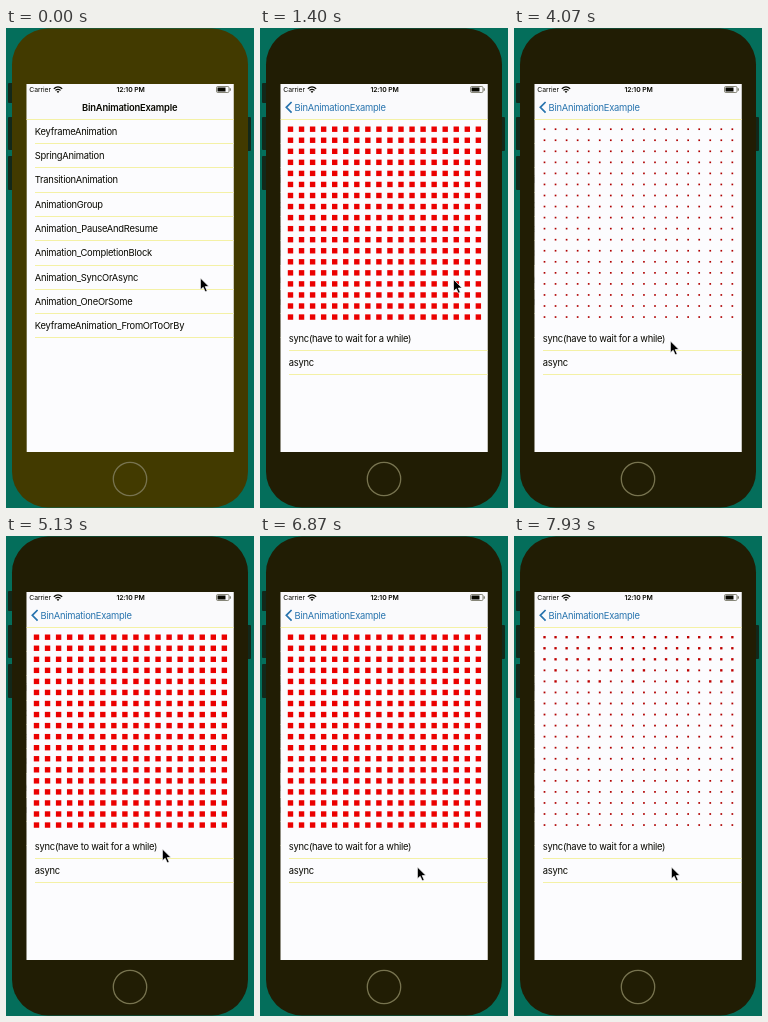
Animation of 248x480 px, one loop 8 s. Source, as an HTML page:

```html
<!DOCTYPE html>
<html lang="en">
<head>
<meta charset="utf-8">
<title>Animation list</title>
<style>
  html, body { margin: 0; width: 100%; height: 100%; overflow: hidden; background: #046e5b; }
  svg { display: block; width: 248px; height: 480px; }
  text { font: 9.4px Inter, "Liberation Sans", sans-serif; letter-spacing: -.25px; fill: #080800; }
  .title { font-weight: 600; letter-spacing: -.2px; }
  .back { fill: #2874ae; }
  .status { font-size: 6.8px; letter-spacing: -.1px; }
  .clock { font-weight: 600; text-anchor: middle; }
  .line { fill: #f4f1a6; }
</style>
</head>
<body>
<svg viewBox="0 0 248 480">
  <defs>
    <clipPath id="screen"><rect x="20.7" y="56" width="206.8" height="368"/></clipPath>
  </defs>

  <g fill="#12281a">
    <rect x="2" y="55" width="6" height="20" rx="1"/>
    <rect x="2" y="89" width="6" height="33" rx="1"/>
    <rect x="2" y="128" width="6" height="34" rx="1"/>
    <rect x="239" y="89" width="6" height="34" rx="1"/>
  </g>
  <rect id="body" x="6" y="0.5" width="236" height="479" rx="36"/>
  <circle cx="124" cy="451" r="16.7" fill="none" stroke="#77734f" stroke-width="1.3"/>

  <g clip-path="url(#screen)">
    <rect x="20" y="56" width="208" height="368" fill="#fcfcfe"/>
    <g id="list">
      <rect id="selected" x="20" y="237.5" width="208" height="24.3" fill="#d9d9d9"/>
    </g>
    <rect id="dim" x="20" y="92" width="208" height="332" fill="#7d6c00"/>
    <g id="detail">
      <rect x="20" y="92" width="208" height="332" fill="#fcfcfe"/>
      <g id="grid"></g>
    </g>

    <rect x="20" y="56" width="208" height="36" fill="#fafafc"/>
    <rect class="line" x="20" y="91" width="208" height="1"/>
    <text class="status" x="23.3" y="64.2">Carrier</text>
    <g fill="none" stroke="#080800" stroke-width="1.2">
      <path d="M47.8 60.7Q52 57 56.2 60.7M49.4 62.4Q52 60.2 54.6 62.4"/>
    </g>
    <path d="M50.6 63.4Q52 62.4 53.4 63.4L52 65Z" fill="#080800"/>
    <text class="status clock" x="124.5" y="64.2">12:10 PM</text>
    <rect x="210.5" y="58.5" width="12.5" height="6" rx="1.2" fill="none" stroke="#55553f" stroke-width=".7"/>
    <rect x="211.5" y="59.5" width="8" height="4" fill="#080800"/>
    <rect x="223.7" y="60.3" width="1" height="2.4" fill="#55553f"/>
    <text id="title" class="title" x="76" y="82.8">BinAnimationExample</text>
    <g id="back">
      <path d="M31.6 74L26.3 79.3L31.6 84.6" fill="none" stroke="#2874ae" stroke-width="1.7"/>
      <text id="backText" class="back" x="34.6" y="82.8">BinAnimationExample</text>
    </g>
  </g>

  <path id="cursor" d="M0 0V11.8L2.8 9.3L4.8 13.8L6.8 12.9L4.8 8.6H8.6Z" fill="#000" stroke="#fff" stroke-width=".7"/>
</svg>
<script>
const LOOP = 8000, STEP = 1000 / 15;
const ROW = 24.3, WIDTH = 207;
const COUNT = 18, PITCH = 11.05, SIZE = 5.4;
const PUSH = 380, SYNC = 3180, HALF = 900, SMALL = 0.3;
const $ = id => document.getElementById(id);

function add(parent, tag, attrs, content = "") {
  const node = document.createElementNS("http://www.w3.org/2000/svg", tag);
  for (const key in attrs) node.setAttribute(key, attrs[key]);
  node.textContent = content;
  return parent.appendChild(node);
}

function addRows(parent, labels, top) {
  labels.forEach((label, i) => {
    add(parent, "text", { x: 28.8, y: top + ROW * i + 15.4 }, label);
    add(parent, "rect", { class: "line", x: 29, y: Math.round(top + ROW * (i + 1) - 0.7), width: 199, height: 1 });
  });
}

addRows($("list"), [
  "KeyframeAnimation", "SpringAnimation", "TransitionAnimation", "AnimationGroup",
  "Animation_PauseAndResume", "Animation_CompletionBlock", "Animation_SyncOrAsync",
  "Animation_OneOrSome", "KeyframeAnimation_FromOrToOrBy"
], 91.4);
addRows($("detail"), ["sync(have to wait for a while)", "async"], 298.2);

const squares = [];
for (let row = 0; row < COUNT; row++) {
  for (let col = 0; col < COUNT; col++) {
    const noise = Math.abs(Math.sin(row * 12.9 + col * 78.2) * 437.5) % 1;
    const early = row < 3 || (row < 5 && noise > 0.6);
    squares.push({
      x: 30.5 + col * PITCH,
      y: 101.2 + row * PITCH,
      start: early ? 6860 : 6980 + row * 2,
      node: add($("grid"), "rect", {})
    });
  }
}

const clamp = v => Math.min(1, Math.max(0, v));
const smooth = v => v * v * (3 - 2 * v);

// Shrinks for one half, then grows back.
function pulse(t, start) {
  const phase = (t - start) / HALF;
  return phase <= 0 || phase >= 2 ? 1 : SMALL + (1 - SMALL) * Math.abs(1 - phase);
}

// Critically damped spring used for the page push.
function spring(t) {
  const s = Math.max(0, t - PUSH) * 0.0183;
  return s > 14 ? 1 : 1 - (1 + s) * Math.exp(-s);
}

const cursorPath = [[0, 194, 250], [1300, 194, 250], [2400, 156, 313], [5400, 156, 313], [6300, 157, 331], [LOOP, 157, 331]];
function cursorAt(t) {
  const i = cursorPath.findIndex(p => p[0] > t);
  const [a, b] = [cursorPath[i - 1], cursorPath[i]];
  const k = smooth((t - a[0]) / (b[0] - a[0]));
  return [a[1] + (b[1] - a[1]) * k + 0.4, a[2] + (b[2] - a[2]) * k];
}

const move = (id, x, y = 0) => $(id).setAttribute("transform", `translate(${x} ${y})`);
const fade = (id, value) => $(id).setAttribute("opacity", value);

function draw(t) {
  const p = spring(t);
  $("body").setAttribute("fill", t < PUSH ? "#423a00" : "#211d04");
  move("list", -0.3 * WIDTH * p);
  move("detail", WIDTH * (1 - p));
  fade("dim", 0.13 * clamp(p * 2));
  fade("selected", t > 270 ? 1 : 0);
  move("title", -41 * p);
  fade("title", clamp(1 - p * 1.6));
  move("backText", 41 * (1 - p));
  fade("back", clamp(p * 1.6 - 0.5));
  move("cursor", ...cursorAt(t));

  for (const { x, y, start, node } of squares) {
    const scale = pulse(t, SYNC) * pulse(t, start);
    const size = SIZE * scale;
    node.setAttribute("x", x - size / 2);
    node.setAttribute("y", y - size / 2);
    node.setAttribute("width", size);
    node.setAttribute("height", size);
    node.setAttribute("fill", `rgb(${Math.round(160 + 75 * clamp(scale * 1.6 - 0.3))} 0 0)`);
  }
}

const origin = performance.now();
function tick() {
  const t = (performance.now() - origin) % LOOP;
  draw(Math.min(LOOP - 1, Math.floor((t + 4) / STEP) * STEP));
  requestAnimationFrame(tick);
}
tick();
</script>
</body>
</html>
```
